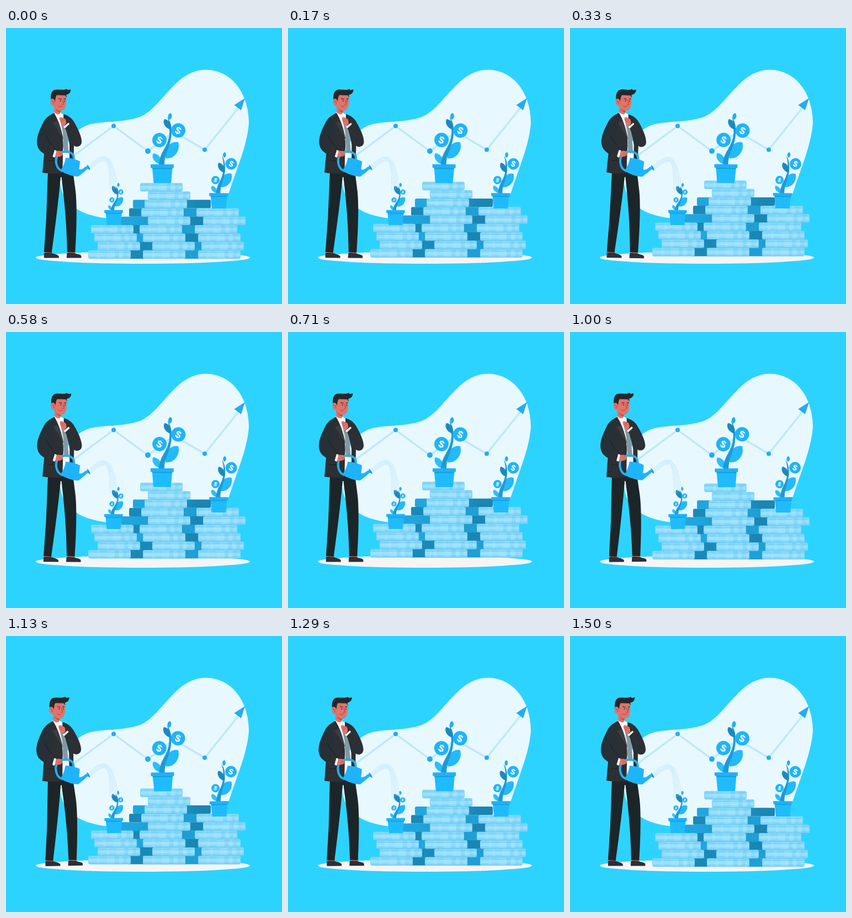
Animation, 500 px wide and 500 px high, one loop 1.54 s. Source, as an HTML page:

```html
<!DOCTYPE html>
<html lang="en">
<head>
<meta charset="utf-8">
<title>Growing savings</title>
<style>
  html, body { margin: 0; width: 100%; height: 100%; overflow: hidden; background: #2dd3ff; }
  svg { display: block; width: 100vw; height: 100vh; }
  .money { font: bold 18px "Liberation Sans", Arial, sans-serif; fill: #fff; text-anchor: middle; }
  .line { fill: none; stroke-linecap: round; stroke-linejoin: round; }
</style>
</head>
<body>
<svg viewBox="0 0 500 500">
  <defs>
    <linearGradient id="down"><stop offset=".15" stop-color="#20a6df"/><stop offset=".85" stop-color="#1986b3"/></linearGradient>
    <linearGradient id="up"><stop offset=".15" stop-color="#1a89b8"/><stop offset=".85" stop-color="#209fd5"/></linearGradient>
    <g id="coin">
      <rect width="77" height="15.2" rx="3" fill="#82d6f9"/>
      <rect x="1" y="5" width="75" height="6" rx="1.5" fill="#9be0fc"/>
      <path d="M16 1h5v13h-5zM34 1h14v13H34zM56 1h6v13h-6z" fill="#b5eaff" opacity=".25"/>
      <path d="M48 1h7v13h-7zM64 1h6v13h-6z" fill="#5fc5f0" opacity=".2"/>
      <path d="M2 14.7H75" stroke="#68c8ef"/>
      <path d="M3 3.8H74" stroke="#74cff5" stroke-width=".8"/>
    </g>
    <g id="pot">
      <path d="M-18 -28H18.5L16 0H-15.5Z" fill="#1fbcfd"/>
      <path d="M-18 -28H18.5L18.2 -25.5H-17.8Z" fill="#189cda"/>
      <rect x="-21" y="-34" width="42" height="6.6" rx=".8" fill="#1fb2f7"/>
    </g>
  </defs>

  <path fill="#e8f8ff" d="M98 280C95 238 108 192 146 176.500C171 168 199 172 233 164C280 155 300 78 361 75.500C412 76 440 122 440 172C437 212 419 252 404 298C386 334 330 348 270 348L190 345C155 343 103 330 98 280Z"/>
  <g class="line" stroke="#bce8fb" stroke-width="3.400">
    <path d="M112 239L195 177.500L257 223L304 188L360 220.500L424 141"/>
  </g>
  <g fill="#20aef0">
    <circle cx="195" cy="177.500" r="4"/>
    <circle cx="257" cy="223" r="5"/>
    <circle cx="360" cy="220.500" r="4"/>
    <path d="M433 127L413.500 139.500L426 149Z"/>
  </g>
  <ellipse cx="248" cy="416" rx="194" ry="11" fill="#f5f5f5"/>

  <g id="coins"></g>
  <g id="plants"></g>

  <g id="man">
    <g fill="#e0736a">
      <path d="M70 403H83V409H70ZM112 403H125V409H112Z"/>
    </g>
    <g fill="#2c2f33">
      <path d="M69 408C73 406 78 408 83 407.500C87 410 95 410 96 414V416.500H69Z"/>
      <path d="M110.500 408C114 406 119 408 124 407.500C128 410 136 410 136.500 413V416.500H110Z"/>
    </g>
    <path fill="#1c2528" d="M76 258L73 345L69 406L83 407C88 370 95 315 99 270H100.500C104 300 110 345 111 406L125.500 406.500C128 365 129 320 126 295L121 258Z"/>

    <path fill="#f7f7f7" d="M86 153L92 150L105 157L115.500 237H102Z"/>
    <path fill="#8299a3" d="M97 162L102 163L111 196L113.500 224L109 227L104.500 222L103 190Z"/>
    <path fill="#263036" d="M87 154C78 158 71 163 67 172C61 184 55 197 56 209C57.500 221 64 224 69 228L66 262C78 264 91 265 102 263L103 222C105 202 100 176 87 154Z"/>
    <path fill="#2c2f33" d="M87 154C82 156 80 165 82 180C85 200 80 215 72 230L68 262C80 264 91 265 102 263L103 222C105 202 100 176 87 154Z"/>
    <path fill="#2c2f33" d="M104 156C112 158 119 163 123 170C130 182 137 196 137 206C137 215 127 217 123 213L122 262H115L115 212C113 198 108 184 104 171Z"/>
    <path fill="#3a3e43" d="M87 155L94 168L85 172L91 180L104 202C101 186 96 170 87 155Z"/>
    <path class="line" stroke="#191b1e" stroke-width=".8" d="M72 195C77 207 86 213 90 221M113 183L124 197M75 240L88 241"/>

    <path fill="#e0736a" d="M87 140H99L98 152C99 156 95 159 87 153Z"/>
    <path fill="#b9544f" d="M90 146C93 149 96 150 99 149.500L98.500 153C94 152 91 150 90 146Z"/>
    <path fill="#e0736a" d="M86 122C92 118 104 118 108.500 121L109 133C109 141 107 149 101 149.500C96 150 91 147 88.500 142L86 134Z"/>
    <path fill="#24282c" d="M83 133C79 127 81 114 88 112C95 110 104 114 110 110C110 112 113 113 117 111C118 116 114 120 109 121L110 126C108 124 108 122 106 122L92 121.500C89 124 90 130 88 134L87 137Z"/>
    <path fill="#e0736a" d="M88 131C86 127 81 127 80.500 132C80 138 83 142.500 89 142Z"/>
    <g class="line" stroke="#9f3f44" stroke-width=".9">
      <path d="M102.500 131L104.500 138L101.500 138.500M95 141.500C98 143 100 142.500 102 141M83 132C85 132 86 134 86 137"/>
    </g>
    <g class="line" stroke="#24272b" stroke-width="1.200">
      <path d="M95.500 128L100 128.800M105 129L108 128"/>
    </g>
    <g fill="#24272b"><circle cx="98.500" cy="132" r="1"/><circle cx="106" cy="132.500" r=".9"/></g>

    <path fill="#e0736a" d="M97 166C96 161 101 160 104 164C108 163 109 168 109 173L105 178L100 174Z"/>
    <path class="line" stroke="#b9544f" stroke-width=".8" d="M99 167L104 165M100 170L105 168"/>
    <path fill="#fff" d="M104 179L113 171.500L115 174L107 181.500Z"/>
    <path fill="#2c2f33" d="M107 182L115.500 174L125 184V204L116 198Z"/>

    <path class="line" stroke="#1fb0f4" stroke-width="4" d="M104 259C91 258 88 240 93 231C99 221 118 222 122 231C123 234 123 237 123 240"/>
    <path fill="#e0736a" d="M90 224C95 221 102 223 103 227C103 232 99 234 89 233Z"/>
    <path class="line" stroke="#b9544f" stroke-width=".7" d="M96 227H102M96 230H101"/>
    <path fill="#fff" d="M88 221L91.500 222L88.500 235L84.500 233Z"/>
    <path fill="#1fb4f9" d="M108 235C117 235 127 238 134 241.500L132.500 256C139 257 141 253 146 250L149 254C144 259 137 264 131 269C120 269 108 264 98.500 259C103 252 107 244 108 235Z"/>
    <path fill="#1d9edb" d="M146.500 247.500C149 248 153 254 152.500 257.500L148 255Z"/>
    <g id="water" class="line" stroke="#a6def8" stroke-width=".8" stroke-dasharray="2.200 2"></g>
  </g>
</svg>

<script>
  const $ = id => document.getElementById(id);

  // Coin stacks: left edges from the top row down, rows end at the ground.
  const PITCH = 15.25, BASE = 403;
  const stacks = [
    [154, 160, 166, 149],
    [243, 257, 251, 245, 257, 242, 248, 265, 248],
    [345, 357, 342, 348, 354, 348]
  ];
  // Rear slabs between the stacks: left, right, shading.
  const slabs = [
    [230, 371, 'down'], [223, 350, 'up'], [208, 362, 'down'], [225, 350, 'up'],
    [232, 352, 'down'], [238, 358, 'up'], [220, 352, 'up']
  ];
  const rowY = (i, n) => BASE - (n - 1 - i) * PITCH;

  $('coins').innerHTML = slabs.map(([l, r, shade], i) =>
    `<rect x="${l}" y="${rowY(i, 7)}" width="${r - l}" height="15.3" rx="2.500" fill="url(#${shade})"/>`
  ).join('') + stacks.map(s => s.map((x, i) =>
    `<use href="#coin" x="${x}" y="${rowY(i, s.length)}"/>`).join('')).join('');

  // A leaf from its base to its tip, b is the bulge relative to its length.
  function leaf([x, y, tx, ty], b, fill) {
    const dx = tx - x, dy = ty - y;
    const at = (u, v) => `${x + dx * u - dy * v} ${y + dy * u + dx * v}`;
    return `<path fill="${fill}" d="M${x} ${y}C${at(.2, b)} ${at(.75, b)} ${tx} ${ty}C${at(.85, -b)} ${at(.3, -b)} ${x} ${y}Z"/>`;
  }

  const dollar = ([x, y, r]) =>
    `<g transform="translate(${x} ${y}) scale(${r / 13})"><circle r="13" fill="#1fb4f8"/>` +
    `<text class="money" y="6.300" transform="rotate(22)">$</text></g>`;

  function stem(x, y, tx, ty, w) {
    const h = y - ty;
    return `<path fill="#1d9ad4" d="M${x - w} ${y}C${x - w * .6} ${y - h * .3} ${tx - w * .4} ${y - h * .35} ${tx} ${y - h * .65}` +
      `C${tx + w * .1} ${y - h * .8} ${tx - w * .2} ${ty + h * .1} ${tx - w * .8} ${ty}` +
      `C${tx + w * .4} ${ty + h * .1} ${tx + w * .9} ${y - h * .8} ${tx + w * .7} ${y - h * .6}` +
      `C${tx + w * .2} ${y - h * .33} ${x + w} ${y - h * .25} ${x + w} ${y}Z"/>`;
  }

  const plants = [
    { pot: [283, 281, 1], stem: [282, 248, 296, 160, 5], top: [296, 166, 298, 154], dark: [298, 184, 287, 165],
      big: [289, 236, 312, 207], low: [280, 247, 267, 227], coins: [[278, 203, 13], [312, 185.5, 13]], mid: [294, 217.5] },
    { pot: [385.5, 327, .82], stem: [384.5, 300, 394, 231, 4], top: [395, 235, 396.5, 225], dark: [395, 262, 385.5, 244],
      big: [388, 288, 408.5, 264], low: [381.5, 299, 372.5, 286], coins: [[379.5, 275.5, 7.5], [408, 246, 10.5]], mid: [393.5, 276] },
    { pot: [195, 357, .8], stem: [193, 331, 201.5, 286, 3], top: [203, 288, 204, 280.5], dark: [202, 302, 193, 286],
      big: [197, 323, 212, 307], low: [191, 330, 186, 321], coins: [[192, 311.5, 4.7], [208, 297, 4.7]], mid: [195.5, 318.5] }
  ];
  $('plants').innerHTML = plants.map(p => {
    const [x, y, s] = p.pot;
    return '<g>' + leaf(p.low, .33, '#2bbffa') + leaf(p.big, .36, '#22bafa') +
      stem(...p.stem) + leaf(p.top, .38, '#20aff0') + leaf(p.dark, .32, '#1b8ac0') +
      p.coins.map(dollar).join('') +
      `<use href="#pot" transform="translate(${x} ${y}) scale(${s})"/></g>`;
  }).join('');

  // Dashed jets falling from the spout.
  $('water').innerHTML = [0, 1, 2, 3, 4].map(i =>
    `<path stroke-dashoffset="${i * 1.7}" d="M${151 + i * .5} ${249 + i * 1.6}` +
    `C${160 + i} ${239 + i * 1.8} ${169 + i} ${232 + i * 1.8} ${179 + i * .3} ${233 + i * 1.8}` +
    `C${192 - i * 1.5} ${234 + i * 2.2} ${198 - i * 2.4} 262 ${202 - i * 3.4} ${288 + i * 1.2}"/>`).join('');

  const LOOP = 1540, FPS = 24, CYCLE = 36;
  const swaying = [[$('man'), [96, 264]], ...plants.map((p, i) => [$('plants').children[i], p.mid])];

  // Linear sway: 0, +1 degree at a quarter, -1 at three quarters, 0.
  const sway = p => p < .25 ? p * 4 : p < .75 ? 2 - p * 4 : p * 4 - 4;

  function draw(now) {
    const t = Math.floor(now % LOOP / 10) * 10 + 4.99;
    const step = Math.floor(t * FPS / 1000);
    const p = (step + .5) / CYCLE % 1;
    $('coins').setAttribute('transform', `translate(0 ${-10 * (1 - Math.abs(2 * p - 1))})`);
    for (const [el, [x, y]] of swaying) el.setAttribute('transform', `rotate(${sway(p)} ${x} ${y})`);
  }

  let start;
  function tick(now) {
    start ??= now;
    draw(now - start);
    requestAnimationFrame(tick);
  }
  draw(0);
  requestAnimationFrame(tick);
</script>
</body>
</html>
```
